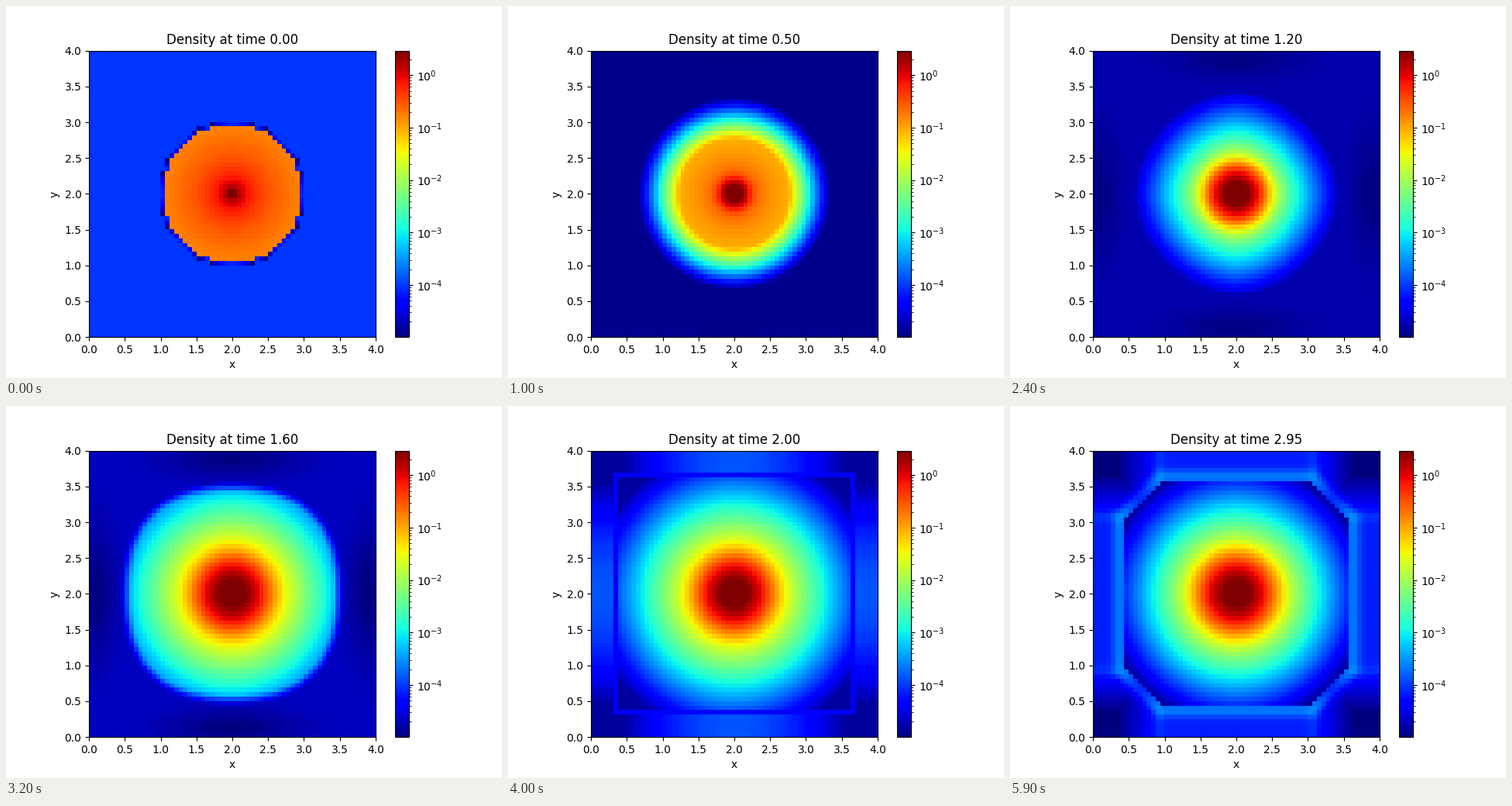
A matplotlib script for the animation above (6 s loop, 640x480 px).

```python
import numpy as np
import matplotlib.pyplot as plt
from matplotlib.animation import FuncAnimation
from matplotlib.colors import LogNorm

N, SIZE = 64, 4.0
FRAMES, INTERVAL, DT = 60, 100, 0.05
CELL = SIZE / N
DISK = 15.45 * CELL

axis = (np.arange(N) + 0.5) * CELL - SIZE / 2
X, Y = np.abs(np.meshgrid(axis, axis))
R = np.hypot(X, Y)
FAR, NEAR = np.maximum(X, Y), np.minimum(X, Y)


def lerp(a, b, u):
    return a + (b - a) * u


def ramp(t, start, end):
    return np.clip((t - start) / (end - start), 0, 1)


def smooth(t, start, end):
    u = ramp(t, start, end)
    return u * u * (3 - 2 * u)


def bump(v, centre, width):
    return np.exp(-((v - centre) / width) ** 2)


def norm(p):
    """Radius whose level lines are diamonds (p < 2) or squares (p > 2)."""
    return (X**p + Y**p) ** (1 / p)


# All profiles below are log10 of density.

def background(t):
    level = np.interp(t, [0, 0.4, 1.6, 2.5], [-4.02, -4.93, -4.68, -5.0])
    dip = 0.3 * ramp(t, 0.4, 1.6) * (1 - ramp(t, 1.6, 2.0))
    return level - dip * bump(FAR, 1.88, 0.25) * bump(NEAR, 0, 0.9)


def collapse(t):
    """Density cusp falling inwards while its edge spreads out."""
    cusp = 10 ** (-0.8 - 0.7 * t) / R
    core = ramp(t, 0, 0.5) * 10 ** (0.6 - 22 * R**2)
    edge = np.maximum(R - (DISK - 0.4 * t), 0)
    return np.log10(cusp + core) - 3.2 / max(t, 0.005) * edge


def rebound(t):
    """Gaussian core in an exponential halo, cut off by a moving front."""
    u = smooth(t, 1.2, 1.6)
    core = lerp(0.66, 0.55, u) - lerp(9, 5.2, u) * R**2
    slope = lerp(3.1, 2.4, u) + 0.35 * ramp(t, 1.6, 2.95)
    halo = lerp(-0.27, 0.2, u) - slope * norm(lerp(1.8, 2, u))
    front = 1.4 + 2.2 * max(t - 1.6, 0)
    cut = 8 * np.maximum(norm(lerp(2, 2.6, u)) - front, 0)
    return np.log10(10**core + 10**halo) - cut


def add_rim(field):
    """Depleted cells bordering the initial sphere."""
    disk = R < DISK
    near = np.zeros_like(disk)
    for side in (0, 1):
        for step in (-1, 1):
            near |= np.roll(disk, step, side)
    value = np.maximum(-4.1 - 1.3 * (R / CELL - 15.5), -4.9)
    return np.where(near & ~disk, value, field)


def add_reflection(field, t):
    """Wave returning from the walls behind an octagonal front."""
    keys = [1.8, 2.0, 2.95]
    wall = np.interp(t, keys, [2.0, 1.64, 1.56])
    chamfer = np.interp(t, keys, [4.0, 3.36, 2.6])
    depth = np.maximum(FAR - wall, (X + Y - chamfer) / np.sqrt(2))
    bend = chamfer - wall

    early = np.maximum(-3.85 - 0.42 * NEAR**2, -4.85)
    early = np.where(depth < 0.05, -4.4, early)
    late = (-4.15 + 0.5 * bump(depth, 0.07, 0.1)
            + 0.15 * bump(NEAR, bend + 0.05, 0.08)
            - ramp(NEAR, bend, bend + 0.75))
    wave = lerp(early, late, ramp(t, 2.0, 2.4))
    return np.where(depth > 0, np.maximum(wave, -5), field)


def density(i):
    t = i * DT
    body = lerp(collapse(t), rebound(t), smooth(t, 0.5, 1.2))
    field = np.maximum(body, background(t))
    if i == 0:
        field = add_rim(field)
    if t > 1.8:
        field = add_reflection(field, t)
    return 10.0 ** field


fig, ax = plt.subplots(figsize=(6.4, 4.8), dpi=100)
image = ax.imshow(density(0), origin="lower", extent=[0, SIZE, 0, SIZE],
                  cmap="jet", norm=LogNorm(1.02e-5, 2.94))
fig.colorbar(image)
ticks = np.arange(0, 4.1, 0.5)
ax.set(xlabel="x", ylabel="y", xticks=ticks, yticks=ticks)
title = ax.set_title("Density at time 0.00")


def update(i):
    image.set_data(density(i))
    title.set_text(f"Density at time {i * DT:.2f}")
    return image, title


anim = FuncAnimation(fig, update, frames=FRAMES, interval=INTERVAL,
                     repeat=True, repeat_delay=0)
plt.show()
```
